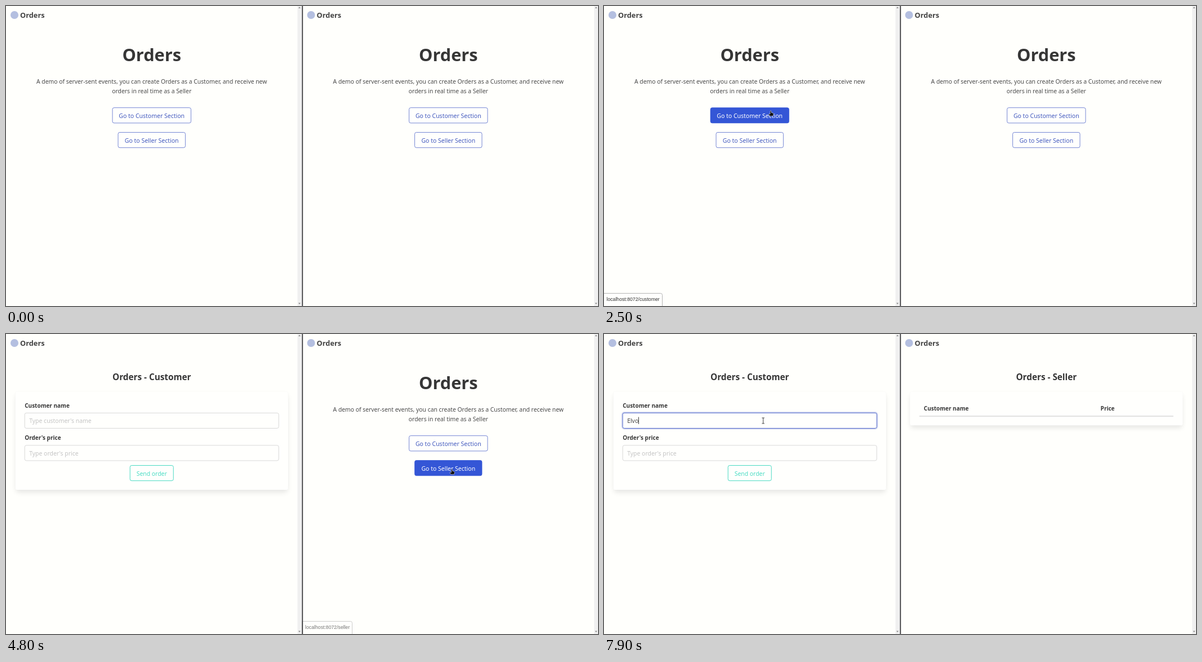
Write an HTML page that moves like this. It is 1051 by 533 pixels and loops after 8000 ms.

```html
<!DOCTYPE html>
<html lang="en">
<head>
<meta charset="utf-8">
<title>Orders</title>
<style>
html, body { margin: 0; height: 100%; overflow: hidden; background: #fffffc; }
svg { display: block; width: 1051px; height: 533px; font: 10.37px "Noto Sans", "Open Sans", sans-serif; }
text { fill: #4a4a4a; white-space: pre; }
.mid { text-anchor: middle; }
.bold { font-weight: 600; font-size: 10px; fill: #363636; }
.brand { font-size: 12.8px; fill: #434343; }
.h1 { font-size: 30.7px; }
.h2 { font-size: 15.3px; }
rect { fill: #fffffd; stroke-width: .75; }
.btn rect { stroke: #485fc7; }
.btn text { fill: #435abf; font-size: 10.5px; }
.btn.hover rect { fill: #3456d6; stroke: #3456d6; }
.btn.hover text { fill: #fff; }
.btn.send rect { stroke: #48d9c2; stroke-width: 1; }
.btn.send text { fill: #48dcc3; font-size: 10.4px; }
.field rect { stroke: #d4d4d4; stroke-width: .9; }
.field text { fill: #c4c4c4; font-size: 10.45px; }
.field.hover rect { stroke: #b5b5b5; }
.field.focus rect { stroke: #485fc7; }
svg .ring.ring { fill: none; stroke: #485fc7; stroke-opacity: .3; stroke-width: 1.6; visibility: hidden; }
svg .focus .ring { visibility: visible; }
.shadow { fill: #0a0a0a; opacity: .1; filter: blur(5px); }
.card { stroke: #0a0a0a; stroke-opacity: .025; }
.track { fill: #f0f0f0; }
.bubble path { fill: #fffffd; stroke: #b4b4b4; }
.bubble text { font: 8.7px "Liberation Sans", Arial, sans-serif; fill: #333; }
</style>
</head>
<body>
<svg id="stage" viewBox="0 0 1051 533"></svg>
<script>
const LOOP = 8000, STEP = 100, PANE = 526.6, MID = 258.7, LEFT = 33.2, WIDE = 451, ROW = 27.2;
const NAME = "Elvo";

const text = (x, y, str, cls = "") => `<text x="${x}" y="${y}" class="${cls}">${str}</text>`;
const rect = (x, y, w, h, cls = "", r = 3) =>
  `<rect x="${x}" y="${y}" width="${w}" height="${h}" rx="${r}" class="${cls}"/>`;
const control = (x, y, w) => rect(x, y, w, ROW) + rect(x - 1.2, y - 1.2, w + 2.4, ROW + 2.4, "ring", 4);

const button = (y, w, label, id, cls = "") =>
  `<g class="btn ${cls}" id="${id}">${control(MID - w / 2, y, w)}${text(MID, y + 18, label, "mid")}</g>`;

const field = (y, label, hint, id) => text(LEFT, y - 9.6, label, "bold") +
  `<g class="field" id="${id}">${control(LEFT, y, WIDE)}${text(41.2, y + 18, hint)}</g>`;

const panel = (title, h) => text(MID, 82, title, "mid bold h2") +
  rect(18, 109, 481.5, h - 3, "shadow") + rect(16.5, 102, 484.5, h, "card");

const home = `
  ${text(MID, 98, "Orders", "mid bold h1")}
  ${text(MID, 138.3, "A demo of server-sent events, you can create Orders as a Customer, and receive new", "mid")}
  ${text(MID, 154.8, "orders in real time as a Seller", "mid")}`;

const orderForm = panel("Orders - Customer", 175) +
  field(140.3, "Customer name", "Type customer's name", "name") +
  `<text id="typed" x="41.2" y="158.3"/><path id="caret" d="M0 147.5v12.5" stroke="#222" stroke-width=".9"/>` +
  field(197.8, "Order's price", "Type order's price", "price") +
  button(233.5, 77, "Send order", "send", "send");

const orderTable = panel("Orders - Seller", 60.5) +
  text(41.2, 136, "Customer name", "bold") + text(355, 136, "Price", "bold") +
  `<path d="M${LEFT} 146h${WIDE}" stroke="#d8d8d8" stroke-width="1.3"/>`;

const pane = (p, x, page, path, w) => `<g transform="translate(${x})">
  <circle cx="15" cy="16" r="7" fill="#b4bfe0"/>${text(25, 21.2, "Orders", "bold brand")}
  <g id="home${p}">${home}
    ${button(180.7, 139.4, "Go to Customer Section", "customer" + p)}
    ${button(224.5, 119.4, "Go to Seller Section", "seller" + p)}</g>
  <g id="page${p}">${page}</g>
  <g class="bubble" id="bubble${p}">
    <path d="M-1 510.5H${w - 3}q3 0 3 3V534H-1Z"/>${text(4.5, 524, "localhost:8072/" + path)}</g>
  ${rect(517.5, 0, 7.5, 533, "track", 0)}
  <path d="M519 4h4l-2-2.4zM519 527.6h4l-2 2.4z" fill="#8a8a8a"/></g>`;

const $ = id => document.getElementById(id);
$("stage").innerHTML =
  pane("L", 0, orderForm, "customer", 103.5) + pane("R", PANE, orderTable, "seller", 88) +
  `<path d="M526.3 0V533" stroke="#303034" stroke-width="1.7"/>
  <g id="cursor" stroke-linejoin="round" fill="#111" stroke="#fff" stroke-width=".5">
    <path id="arrow" d="M0 0V9.5L2.2 7.5 3.7 11 5.2 10.4 3.8 7H6.6Z"/>
    <path id="hand" d="M-1 .6Q0-.4 1 .6V3.4L4 4.2Q5.2 4.6 5 6L4 9.6H-1.4L-3.8 6.2Q-3.4 5-1 6Z"/>
    <path id="beam" d="M-2-5H2.6M.3-5V5M-2 5H2.6" stroke="#333" stroke-width=".9"/>
  </g>`;

const show = (id, on) => { $(id).style.display = on ? "" : "none"; };
const mark = (id, cls, on) => $(id).classList.toggle(cls, on);
const ramp = (t, a, b) => Math.min(1, Math.max(0, (t - a) / (b - a)));
const ease = f => f < .5 ? 4 * f ** 3 : 1 - 4 * (1 - f) ** 3;
const inside = (p, x, y, w) => p.x > x && p.x < x + w && p.y > y && p.y < y + ROW;

// Pointer glides: start and end time, destination, upward bow of the path
const GLIDES = [
  [800, 1100, 277, 133, 0], [1200, 1400, 285, 181, 0], [1400, 1900, 338, 182, 0],
  [2000, 2500, 296, 186, 0], [3800, 4900, 793, 240.5, 42], [5800, 6700, 282.3, 154, 0]
];

function pointer(t) {
  const p = { x: 186, y: 27 };
  for (const [from, to, x, y, bow] of GLIDES) {
    const e = ease(ramp(t, from, to));
    p.x += (x - p.x) * e;
    p.y += (y - p.y) * e - bow * Math.sin(Math.PI * e);
  }
  return p;
}

function draw(t) {
  const p = pointer(t);
  const overL = t < 3700 && inside(p, 189, 180.7, 139.4);
  const overR = t < 5900 && inside(p, PANE + 199, 224.5, 119.4);
  const overName = t > 3700 && inside(p, LEFT, 140.3, WIDE);
  const focused = t >= 6700;
  const typed = NAME.slice(0, Math.max(0, Math.ceil((t - 7450) / 125)));

  show("homeL", t < 3400);
  show("pageL", t >= 3400);
  show("homeR", t < 5700);
  show("pageR", t >= 5700);
  mark("customerL", "hover", overL);
  mark("customerL", "focus", t >= 3100);
  mark("sellerR", "hover", overR);
  mark("sellerR", "focus", t >= 5500);
  $("bubbleL").style.opacity = ramp(t, 1300, 1700) - ramp(t, 3000, 3350);
  $("bubbleR").style.opacity = ramp(t, 4600, 4900) - ramp(t, 5400, 5700);

  mark("name", "hover", overName);
  mark("name", "focus", focused);
  $("name").querySelector("text").style.display = typed ? "none" : "";
  $("typed").textContent = typed;
  show("caret", focused && (t < 7300 || typed));
  const end = typed ? $("typed").getComputedTextLength() : 0;
  $("caret").setAttribute("transform", `translate(${41.5 + end})`);

  show("cursor", t >= 800);
  show("hand", overL || overR);
  show("beam", overName);
  show("arrow", !overL && !overR && !overName);
  $("cursor").setAttribute("transform", `translate(${p.x} ${p.y})`);
}

function tick() {
  draw(Math.floor(performance.now() % LOOP / STEP) * STEP);
  requestAnimationFrame(tick);
}
tick();
</script>
</body>
</html>
```
